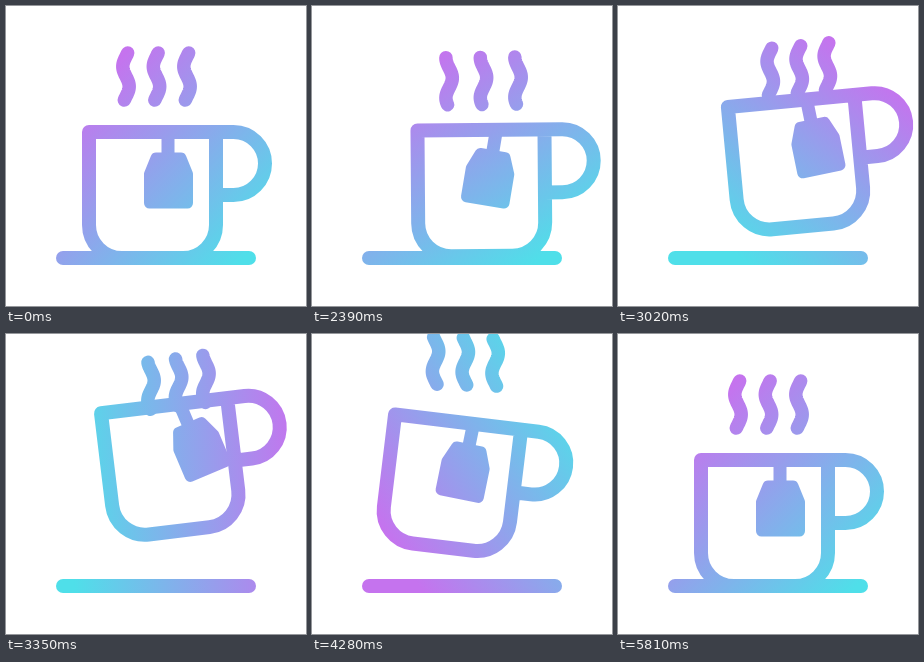
An HTML page with a canvas for the animation above (5840 ms loop, 300 by 300 pixels).

```html
<!DOCTYPE html>
<html lang="en">
<head>
<meta charset="utf-8">
<title>Tea cup</title>
<style>
  html, body { margin: 0; width: 100%; height: 100%; overflow: hidden; background: #fff; }
  canvas { display: block; width: 300px; height: 300px; }
</style>
</head>
<body>
<canvas id="stage" width="300" height="300"></canvas>
<script>
const ctx = document.getElementById('stage').getContext('2d');
const LOOP = 5840, START = 2030, STROKE = 14;
const CUP_TIME = 2930, STEAM_TIME = 3470, TINT_TIME = 3220;
const PURPLE = '#c573ee', CYAN = '#4fdfe9';

const { PI, sin, cos, min, max } = Math;
const rad = deg => deg * PI / 180;
const progress = (t, duration) => min(1, max(0, (t - START) / duration));
const smooth = u => u * u * (3 - 2 * u);

// A single hump from 0 to 1 and back; skew moves the peak, sharpness narrows it.
const pulse = (u, skew, sharpness) => max(0, sin(PI * u ** skew)) ** sharpness;

// Turning points of the swinging tea bag: time and angle.
const swings = [[START, 0], [2500, 11], [3350, -23], [4560, 17], [5150, -8], [5580, 2], [5810, 0]];

function bagAngle(t) {
  const next = swings.findIndex(([time]) => time > t);
  if (next < 1) return 0;
  const [t0, a0] = swings[next - 1], [t1, a1] = swings[next];
  return a0 + (a1 - a0) * smooth((t - t0) / (t1 - t0));
}

const cupPath = new Path2D('M0 0H144.5A31.5 31.5 0 0 1 144.5 63H127M0 0V93A33 33 0 0 0 33 126H94A33 33 0 0 0 127 93V0');
const bagPath = new Path2D('M-12 26H13L19.5 42V71H-18.5V42Z');
const stringPath = new Path2D('M0 0V26');
const saucerPath = new Path2D('M57 252H243');

function stroke(path, width = STROKE) {
  ctx.lineWidth = width;
  ctx.stroke(path);
}

function drawSteam(t) {
  const u = progress(t, STEAM_TIME);
  const phase = 8 * PI * u ** 1.1;
  const dip = 9 * pulse(u, 0.4, 12);
  for (let i = 0; i < 3; i++) {
    const x = 120 + 30.5 * i + 33 * pulse(u, 0.5 - 0.038 * i, 4);
    const y = 70.5 + dip - 44 * pulse(u, 1.5 - 0.1 * i, 2);
    const wisp = new Path2D();
    for (let d = -23.5; d <= 23.5; d++) {
      wisp.lineTo(x + 3.2 * sin(2 * PI * d / 40 + phase), y + d);
    }
    stroke(wisp, 13.5);
  }
}

function drawCup(t) {
  const u = progress(t, CUP_TIME), v = u ** 1.43;
  const angle = rad(-9) * sin(2 * PI * v) * sin(PI * v);
  ctx.save();
  ctx.translate(83 + 36.5 * pulse(u, 0.47, 6), 126 - 65.5 * pulse(u, 1.43, 2));
  ctx.rotate(angle);
  stroke(cupPath);
  ctx.translate(79, 0);
  ctx.rotate(rad(bagAngle(t)) - angle);
  stroke(stringPath, 13);
  stroke(bagPath, 11);
  ctx.fill(bagPath);
  ctx.restore();
}

// Colours everything drawn so far with one turning gradient.
function tint(t) {
  const a = rad(45 + 360 * smooth(progress(t, TINT_TIME)));
  const dx = 115 * cos(a), dy = 115 * sin(a);
  const gradient = ctx.createLinearGradient(178 - dx, 150 - dy, 178 + dx, 150 + dy);
  gradient.addColorStop(0, PURPLE);
  gradient.addColorStop(1, CYAN);
  ctx.save();
  ctx.globalCompositeOperation = 'source-in';
  ctx.fillStyle = gradient;
  ctx.fillRect(0, 0, 300, 300);
  ctx.restore();
}

function frame() {
  const t = performance.now() % LOOP;
  ctx.clearRect(0, 0, 300, 300);
  ctx.lineCap = ctx.lineJoin = 'round';
  stroke(saucerPath);
  drawSteam(t);
  drawCup(t);
  tint(t);
  requestAnimationFrame(frame);
}
frame();
</script>
</body>
</html>
```
